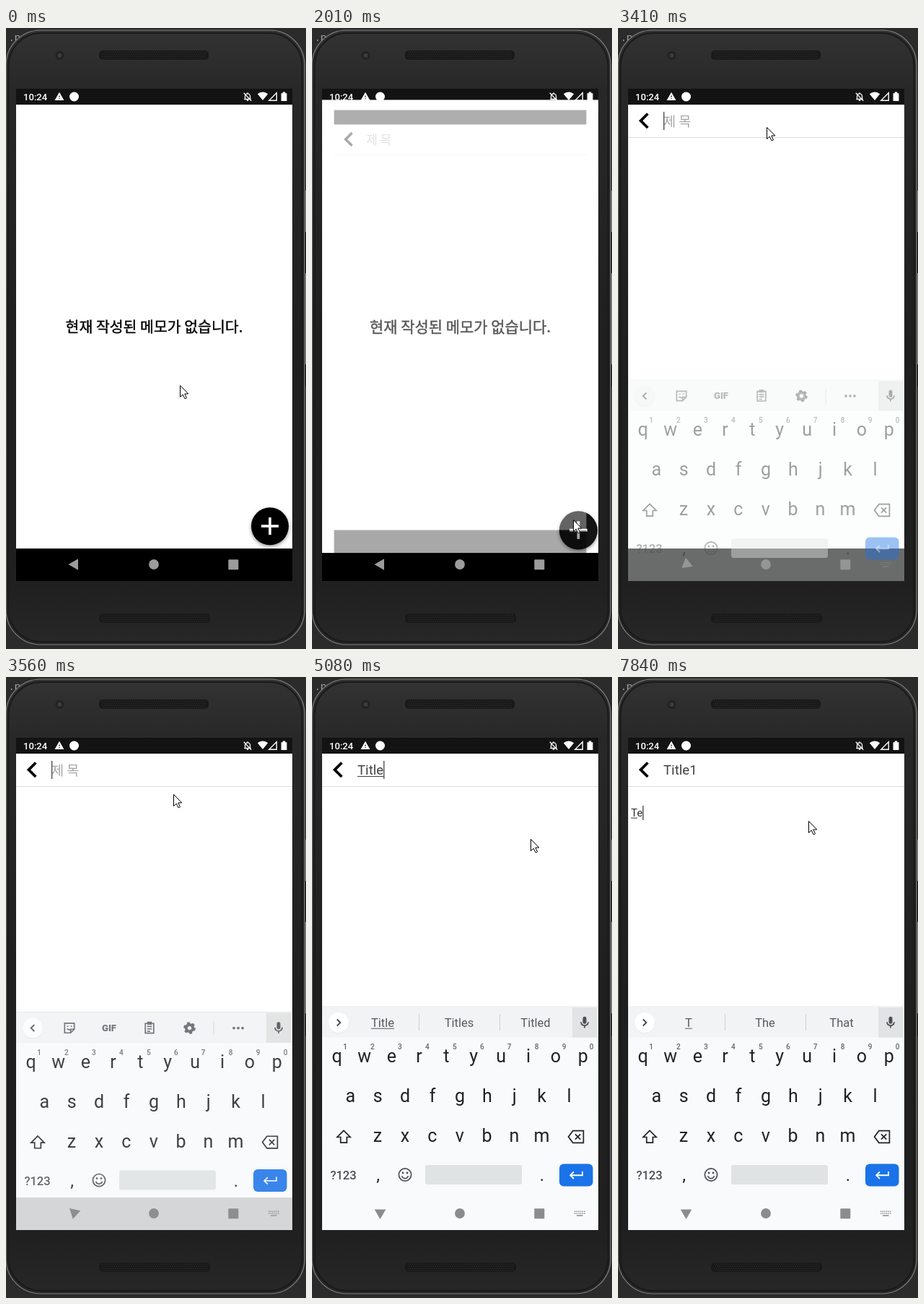
Write an HTML page with a canvas that moves like this. It is 416 by 859 pixels and loops after 8000 ms.

```html
<!DOCTYPE html>
<html lang="ko">
<head>
<meta charset="utf-8">
<title>Memo app</title>
<style>
  html, body { margin: 0; width: 100%; height: 100%; overflow: hidden; background: #2b2b2b; }
  canvas { display: block; }
</style>
</head>
<body>
<canvas id="stage" width="416" height="859"></canvas>
<script>
const ctx = document.getElementById('stage').getContext('2d');
const LOOP = 8000;
const LATIN = 'Roboto, sans-serif';
const KOREAN = '"Noto Sans CJK KR", "Noto Sans CJK", sans-serif';

// Mouse tip: time, x, y
const MOUSE = [
  [840, 241, 494], [1540, 362, 680], [2170, 362, 680], [2290, 308, 598], [2570, 267, 330],
  [2780, 206, 200], [2990, 180, 112], [3270, 180, 112], [3550, 232, 162], [3620, 299, 218],
  [3690, 303, 224], [6130, 303, 224], [6290, 292, 214], [6480, 276, 195], [6920, 276, 195],
  [7300, 264, 199]
];

// Typing: time, title, underlined letters, body, underlined letters, suggestions
const TYPING = [
  [0, '', 0, '', 0, ''],
  [4220, 'T', 1, '', 0, 'T The That'],
  [4480, 'Ti', 1, '', 0, 'T The That'],
  [4680, 'Tit', 2, '', 0, 'Ti Time Times'],
  [4780, 'Titl', 3, '', 0, 'Tit Title Titan'],
  [4880, 'Title', 3, '', 0, 'Titl Title Titles'],
  [5080, 'Title', 5, '', 0, 'Title Titles Titled'],
  [5940, 'Title1', 5, '', 0, 'Title Titles Titled'],
  [6140, 'Title1', 6, '', 0, 'Title1'],
  [6620, 'Title1', 0, '', 0, 'Title1'],
  [6680, 'Title1', 0, '', 0, ''],
  [7500, 'Title1', 0, 'T', 0, 'T The That'],
  [7580, 'Title1', 0, 'T', 1, 'T The That'],
  [7840, 'Title1', 0, 'Te', 1, 'T The That']
];

const ICON = {
  mic: 'M12 14a3 3 0 0 0 3-3V5a3 3 0 0 0-6 0v6a3 3 0 0 0 3 3zm5-3a5 5 0 0 1-10 0H5a7 7 0 0 0 6 6.9V21h2v-3.1A7 7 0 0 0 19 11z',
  warning: 'M1 21h22L12 2zM13 18h-2v-2h2zM13 14h-2v-4h2z',
  wifi: 'M12 21.5 .5 7.5a18 18 0 0 1 23 0z',
  signal: 'M21 3v18H3z',
  bellOff: 'M4 18h16M6 18v-7a6 6 0 0 1 12 0v7M12 2v3M10 21h4M3 3l18 19',
  battery: 'M9 1h6v3h4v19H5V4h4z',
  shift: 'M12 3 2.5 12.5H7.5v8h9v-8h5z',
  backspace: 'M8 4h14v16H8L2 12zM11 8.5l7 7m0-7-7 7',
  sticker: 'M4 4h16v10l-6 6H4zM14 20v-6h6M9 8v2M15 8v2M8 13q3 3 6 1',
  clipboard: 'M5 5h14v16H5zM9 3h6v3H9zM8 10h8M8 14h8M8 18h5'
};

const clamp = v => Math.max(0, Math.min(1, v));
const span = (t, from, to) => clamp((t - from) / (to - from));
const mix = (a, b, p) => a + (b - a) * p;

function rect(x, y, w, h, color, radius = 0) {
  ctx.fillStyle = color;
  ctx.beginPath();
  ctx.roundRect(x, y, w, h, radius);
  ctx.fill();
}
function circle(x, y, r, color) {
  ctx.fillStyle = color;
  ctx.beginPath();
  ctx.arc(x, y, r, 0, Math.PI * 2);
  ctx.fill();
}
function ring(x, y, r, color, width, dash = []) {
  ctx.strokeStyle = color;
  ctx.lineWidth = width;
  ctx.setLineDash(dash);
  ctx.beginPath();
  ctx.arc(x, y, r, 0, Math.PI * 2);
  ctx.stroke();
  ctx.setLineDash([]);
}
function trace(points) {
  ctx.beginPath();
  points.forEach(([x, y]) => ctx.lineTo(x, y));
}
function line(points, color, width) {
  trace(points);
  ctx.strokeStyle = color;
  ctx.lineWidth = width;
  ctx.stroke();
}
function text(str, x, y, font, color, align = 'left') {
  ctx.font = font;
  ctx.fillStyle = color;
  ctx.textAlign = align;
  ctx.fillText(str, x, y);
}
function icon(name, x, y, size, color, stroke) {
  const path = new Path2D(ICON[name]);
  const k = size / 24;
  ctx.save();
  ctx.translate(x - size / 2, y - size / 2);
  ctx.scale(k, k);
  ctx.fillStyle = ctx.strokeStyle = color;
  ctx.lineWidth = stroke / k;
  if (stroke) ctx.stroke(path); else ctx.fill(path, 'evenodd');
  ctx.restore();
}

function grille(x, y, w) {
  rect(x, y, w, 13, '#191919', 5);
  ctx.fillStyle = '#2c2c2c';
  for (let row = 0; row < 4; row++)
    for (let dx = 4 + row % 2 * 1.5; dx < w - 4; dx += 3) ctx.fillRect(x + dx, y + 1.5 + row * 3, 1.3, 1.3);
}

function drawPhone() {
  rect(0, 0, 416, 859, '#2b2b2b');
  text('·.pe', -5, 18, '14px "Noto Sans Mono", monospace', '#a8a8a8');
  const shell = ctx.createLinearGradient(0, 0, 0, 859);
  [[0, '#333'], [.1, '#282828'], [.5, '#1f1f1f'], [.9, '#202020'], [1, '#282828']]
    .forEach(([at, color]) => shell.addColorStop(at, color));
  rect(0, 3, 414, 850, shell, 48);
  ctx.strokeStyle = '#808080';
  ctx.lineWidth = 1.2;
  ctx.stroke();
  ctx.beginPath();
  ctx.roundRect(3.5, 7, 407, 842, 45);
  ctx.strokeStyle = '#1a1a1a';
  ctx.lineWidth = 2;
  ctx.stroke();
  rect(415, 225, 1, 240, '#808080');
  rect(415, 282, 1, 57, '#080808');
  rect(415, 466, 1, 30, '#080808');
  circle(74.5, 38, 6, '#222');
  circle(74.5, 38, 3, '#3a3d3e');
  grille(129, 31, 152);
  grille(129, 810, 154);
}

function page(scale, alpha, content) {
  ctx.save();
  ctx.globalAlpha = alpha;
  ctx.translate(205.5, 424.5);
  ctx.scale(scale, scale);
  ctx.translate(-205.5, -424.5);
  rect(14, 106, 383, 614, '#fff');
  rect(14, 84, 383, 22, '#131313');
  rect(14, 720, 383, 45, '#000');
  content();
  ctx.restore();
}

function drawEmptyList(t) {
  const message = '현재 작성된 메모가 없습니다.';
  text(message, 205.5, 421, '20.5px ' + KOREAN, '#000', 'center');
  ctx.strokeStyle = '#000';
  ctx.lineWidth = .4;
  ctx.strokeText(message, 205.5, 421);
  ctx.save();
  ctx.shadowColor = 'rgba(0,0,0,.4)';
  ctx.shadowBlur = 5;
  ctx.shadowOffsetY = 2;
  circle(366, 689.3, 26, '#000');
  ctx.restore();
  const ripple = span(t, 1600, 1820);
  if (t >= 1670) circle(366, 689.3, 26 * ripple, `rgba(255,255,255,${.22 - .14 * span(t, 1820, 2010)})`);
  rect(354, 687.2, 24, 3.6, '#fff');
  rect(364.2, 677, 3.6, 24, '#fff');
}

function field(str, marked, x, y, size, color, caretOn, caretTop, caretHeight) {
  text(str, x, y, `${size}px ${LATIN}`, color);
  if (marked) rect(x, y + 1.6, ctx.measureText(str.slice(0, marked)).width, 1, color);
  if (caretOn) rect(x + ctx.measureText(str).width, caretTop, 1.3, caretHeight, '#444');
}

function drawEditor(t, [, title, titleMarked, body, bodyMarked]) {
  line([[41.3, 118.5], [31.5, 128.3], [41.3, 138]], '#000', 3.8);
  rect(14, 151, 383, 1, '#ddd');
  if (!title) text('제 목', 63, 135.5, '18.6px ' + KOREAN, '#a6a6a6');
  const blinkOff = t >= 3950 && t < 4220 || t >= 5610 && t < 5940;
  field(title, titleMarked, 63, 135.3, 18.64, '#404040', t >= 3410 && t < 6620 && !blinkOff, 116, 25);
  field(body, bodyMarked, 18, 193, 14.9, '#303030', t >= 6750, 178, 20);
}

function drawToolbar(suggestions) {
  const gray = '#5f6368';
  rect(14, 455.5, 383, 1, '#e4e6e7');
  rect(14, 456.5, 383, 42, '#f1f3f4');
  rect(361, 457, 34, 41.5, '#e1e3e4');
  icon('mic', 378, 478, 20, '#4b4f53');
  circle(37, 478.5, 14.3, '#e3e5e6');
  circle(37, 478, 14, '#fff');
  const words = suggestions ? suggestions.split(' ') : [];
  const dir = words.length ? 1 : -1;
  line([[37 - 2.3 * dir, 473.5], [37 + 2.3 * dir, 478], [37 - 2.3 * dir, 482.5]], '#44474a', 1.8);

  if (!words.length) {
    icon('sticker', 88, 478, 20, gray, 1.7);
    text('GIF', 143, 482.5, `900 13px ${LATIN}`, gray, 'center');
    icon('clipboard', 199, 477.5, 20, gray, 1.7);
    ring(254.5, 478, 4.7, gray, 4);
    ring(254.5, 478, 7.2, gray, 2.4, [3.77, 3.77]);
    rect(287.5, 468, 1, 20, '#cfd2d4');
    [316, 322, 328].forEach(x => circle(x, 478, 1.9, gray));
    return;
  }
  const single = words.length === 1;
  words.forEach((word, i) => {
    const x = single ? 204 : 98 + 106 * i;
    text(word, x, 484, `16.5px ${LATIN}`, '#575b5f', 'center');
    const width = ctx.measureText(word).width;
    if (i === 0) rect(x - width / 2, 485.7, width, 1, '#575b5f');
  });
  if (!single) [148, 260].forEach(x => rect(x, 466, 1, 23, '#cdd0d2'));
}

function drawKeyboard(suggestions) {
  const ink = '#202124', gray = '#4b4f53';
  rect(14, 498, 383, 267, '#f8fafb');
  drawToolbar(suggestions);
  [['qwertyuiop', 34.7, 533], ['asdfghjkl', 53.3, 588], ['zxcvbnm', 91, 643]].forEach(([row, x, y]) =>
    [...row].forEach((key, i) => text(key, x + 37.9 * i, y, `25px ${LATIN}`, ink, 'center')));
  [...'1234567890'].forEach((n, i) => text(n, 46 + 37.95 * i, 515, `500 10px ${LATIN}`, '#62666a', 'center'));
  icon('shift', 44, 636, 23, ink, 1.7);
  icon('backspace', 366, 636, 25, ink, 1.7);
  text('?123', 43.5, 695, `500 16.5px ${LATIN}`, gray, 'center');
  text(',', 91.5, 697, `24px ${LATIN}`, ink, 'center');
  text('.', 319, 697, `24px ${LATIN}`, ink, 'center');
  ring(129, 688.5, 8.6, gray, 1.7);
  circle(126, 686, 1.4, gray);
  circle(132, 686, 1.4, gray);
  ctx.beginPath();
  ctx.arc(129, 689, 4.6, .25, Math.PI - .25);
  ctx.stroke();
  rect(157, 675, 134, 27, '#e0e3e3', 3);
  rect(343, 673.5, 46.5, 31, '#1a73e8', 6);
  line([[375, 684], [375, 689.3], [358.5, 689.3]], '#fff', 1.9);
  line([[363, 684.5], [358.2, 689.3], [363, 694]], '#fff', 1.9);
}

function drawStatusIcons() {
  text('10:24', 24, 100, `500 13.1px ${LATIN}`, '#fff');
  icon('warning', 74, 94.7, 14, '#fff');
  circle(94.5, 95, 6.5, '#fff');
  icon('bellOff', 335, 95, 14, '#fff', 1.3);
  icon('wifi', 356, 94, 15, '#fff');
  icon('signal', 370, 95, 14, '#fff', 1.4);
  icon('battery', 385.5, 94.8, 13.5, '#fff');
}

function drawNavButtons(shown) {
  const shade = Math.round(mix(155, 140, shown));
  const color = `rgb(${shade},${shade},${shade})`;
  ctx.save();
  ctx.translate(94.5, 742);
  ctx.rotate(-Math.PI / 2 * shown);
  trace([[-8, 0], [5.5, -7.8], [5.5, 7.8]]);
  ctx.fillStyle = color;
  ctx.fill();
  ctx.restore();
  circle(205, 742, 6.9, color);
  rect(308.3, 735.2, 14, 14, color, 1);
  ctx.globalAlpha = shown;
  for (let row = 0; row < 2; row++)
    for (let x = 364; x < 379; x += 2.6) rect(x, 738.5 + row * 2.7, 1.5, 1.5, color);
  rect(367, 744.2, 8.5, 1.5, color);
  ctx.globalAlpha = 1;
}

function drawMouse(t) {
  let i = MOUSE.findIndex(stop => stop[0] > t);
  if (i < 0) i = MOUSE.length;
  const from = MOUSE[Math.max(0, i - 1)], to = MOUSE[Math.min(i, MOUSE.length - 1)];
  const p = from === to ? 0 : span(t, from[0], to[0]);
  ctx.save();
  ctx.translate(mix(from[1], to[1], p) + .5, mix(from[2], to[2], p) + .5);
  trace([[0, 0], [0, 16], [3.7, 12.6], [6.6, 18.4], [9, 17.3], [6.3, 11.5], [11.3, 11.5]]);
  ctx.closePath();
  ctx.fillStyle = '#fff';
  ctx.fill();
  ctx.strokeStyle = '#000';
  ctx.lineWidth = 1;
  ctx.stroke();
  ctx.restore();
}

function draw(t) {
  // Motion advances in 70 ms ticks, as in a screen recording
  const tick = 2010 + Math.floor((t - 2010) / 70) * 70;
  const typed = TYPING.findLast(state => t >= state[0]);
  const opening = 1 - (1 - span(tick, 1943, 2343)) ** 3;
  const editorAlpha = span(tick, 1986, 2056);
  const keyboard = 1 - (1 - span(tick, 3307, 3640)) ** 1.5;

  drawPhone();
  ctx.save();
  ctx.beginPath();
  ctx.rect(14, 84, 383, 681);
  ctx.clip();
  if (opening < 1) page(mix(1, 1.05, opening), 1, () => drawEmptyList(t));
  if (editorAlpha > 0) page(mix(.85, 1, opening), editorAlpha, () => drawEditor(t, typed));
  if (keyboard > 0) {
    ctx.save();
    ctx.globalAlpha = keyboard;
    ctx.translate(0, 54 * (1 - keyboard));
    drawKeyboard(typed[5]);
    ctx.restore();
  }
  drawStatusIcons();
  drawNavButtons(keyboard);
  ctx.restore();
  drawMouse(tick);
}

const start = performance.now();
function frame() {
  draw((performance.now() - start) % LOOP);
  requestAnimationFrame(frame);
}
frame();
</script>
</body>
</html>
```
